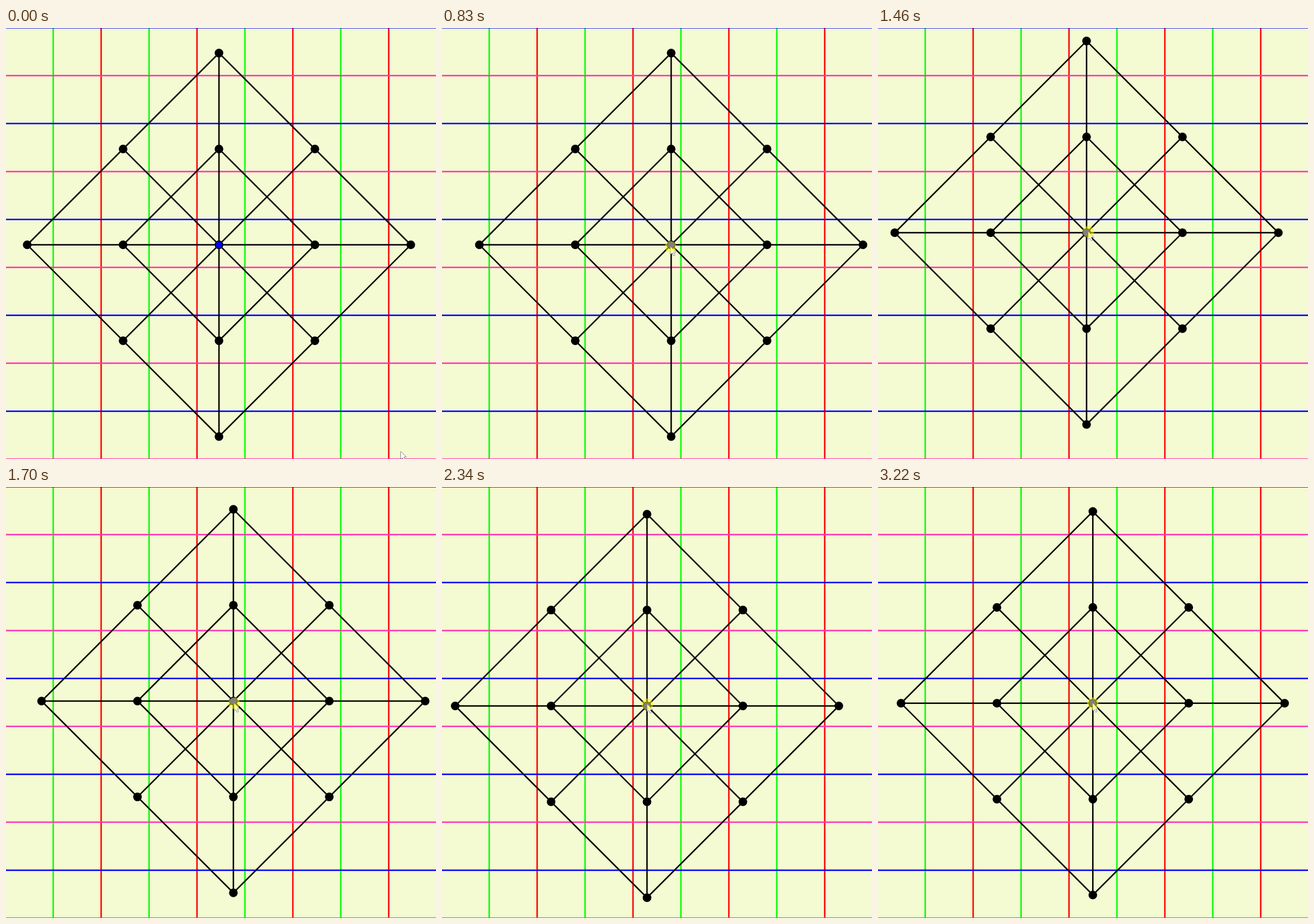
Recreate the animation shown at these times as an HTML page with a canvas. Size 747 px wide and 749 px high, loop 3270 ms.

```html
<!DOCTYPE html>
<html>
<head>
<meta charset="utf-8">
<style>
html, body { margin: 0; width: 100%; height: 100%; overflow: hidden; background: #f4fad2; }
canvas { display: block; }
</style>
</head>
<body>
<canvas id="stage" width="747" height="749"></canvas>
<script>
const ctx = document.getElementById('stage').getContext('2d');
const LOOP = 3270, STEP = 166.6, CELL = STEP / 2;

// Times at which the picture changes
const ticks = [0, 50, 130, 200, 280, 360, 430, 500, 570,
  620, 690, 760, 830, 900, 960, 1020, 1080, 1140,
  1210, 1270, 1330, 1400, 1460, 1530, 1590, 1640, 1700,
  1770, 1830, 1890, 1950, 2010, 2140, 2190, 2230, 2280,
  2340, 2400, 2460, 2520, 2580, 2650, 2720, 2780, 2840,
  2910, 2980, 3100, 3220];

// Path of the dragged centre: time, x, y
const path = [[0, 370, 376.8], [280, 370, 376.8], [360, 365, 371.7], [430, 366, 363],
  [570, 381, 354], [690, 396, 363], [830, 398.1, 376.8], [960, 386, 389],
  [1140, 362, 386], [1270, 355, 372], [1460, 362.3, 355.8], [1530, 371, 353],
  [1700, 395, 372], [1770, 396, 381], [1890, 387, 394], [2010, 368.9, 399.3],
  [2140, 360, 395], [2280, 356, 386], [2400, 357.5, 375], [2500, 365, 370],
  [2650, 378.2, 373.4], [2840, 377, 375.8], [3220, 373.2, 375.8], [3270, 373, 375.8]];

function slope(i, k) {
  const a = path[Math.max(i - 1, 0)], b = path[Math.min(i + 1, path.length - 1)];
  const p = path[i];
  if ((p[k] - a[k]) * (b[k] - p[k]) <= 0) return 0;
  return (b[k] - a[k]) / (b[0] - a[0]);
}

function centreAt(t) {
  t = Math.min(t, LOOP - 1);
  const i = path.findIndex(p => p[0] > t) - 1;
  const a = path[i], b = path[i + 1], d = b[0] - a[0], u = (t - a[0]) / d;
  return [1, 2].map(k =>
    a[k] * (1 + 2 * u) * (1 - u) ** 2 + b[k] * u * u * (3 - 2 * u) +
    d * u * (1 - u) * (slope(i, k) * (1 - u) - slope(i + 1, k) * u));
}

function pointerAt(t) {
  if (t >= 200) return centreAt(t + 30);
  const u = 1 - t / 200;
  return [370 + 316 * u, 376.8 + 359.2 * u];
}

function line(colour, ...points) {
  ctx.strokeStyle = colour;
  ctx.beginPath();
  points.forEach(p => ctx.lineTo(...p));
  ctx.stroke();
}

function disc(x, y, r, fill) {
  ctx.fillStyle = fill;
  ctx.beginPath();
  ctx.arc(x, y, r, 0, 7);
  ctx.fill();
}

function drawGrid() {
  for (let i = 0; i < 8; i++) {
    const x = 82 + i * 83.27;
    line(i % 2 ? '#f00' : '#0f0', [x, 0], [x, 749]);
  }
  for (let i = 0; i < 10; i++) {
    const y = i * CELL - 0.5;
    line(i % 2 ? '#ff34b3' : '#00f', [0, y], [747, y]);
  }
}

function drawLattice(cx, cy) {
  const at = (i, j) => [cx + i * STEP, cy + j * STEP];
  const join = (...cells) => line('#000', ...cells.map(c => at(...c)));
  for (const n of [1, 2]) join([0, -n], [n, 0], [0, n], [-n, 0], [0, -n]);
  join([-2, 0], [2, 0]);
  join([0, -2], [0, 2]);
  join([-1, -1], [1, 1]);
  join([1, -1], [-1, 1]);
  for (let i = -2; i <= 2; i++)
    for (let j = -2; j <= 2; j++)
      if (Math.abs(i) + Math.abs(j) <= 2) disc(...at(i, j), 7.5, '#000');
  disc(cx, cy, 5.8, '#00f');
}

function drawPointer(x, y) {
  ctx.save();
  ctx.translate(x, y);
  ctx.lineWidth = 1;
  ctx.strokeStyle = '#223';
  ctx.fillStyle = '#fff';
  ctx.stroke(arrow);
  ctx.fill(arrow);
  ctx.restore();
}
const arrow = new Path2D('M0 0V13L3 10.4L5.2 15.4L7.2 14.5L5 9.6H9.2Z');

function draw(now) {
  const time = now % LOOP, t = ticks.filter(s => s <= time).pop();
  ctx.fillStyle = '#f4fad2';
  ctx.fillRect(0, 0, 747, 749);
  ctx.lineWidth = 2.5;
  drawGrid();
  drawLattice(...centreAt(t));
  const pointer = pointerAt(t);
  drawPointer(...pointer);
  if (t >= 280) disc(...pointer, 10, 'rgba(255,255,0,.5)');
}

const start = performance.now();
function frame() {
  draw(performance.now() - start);
  requestAnimationFrame(frame);
}
frame();
</script>
</body>
</html>
```
